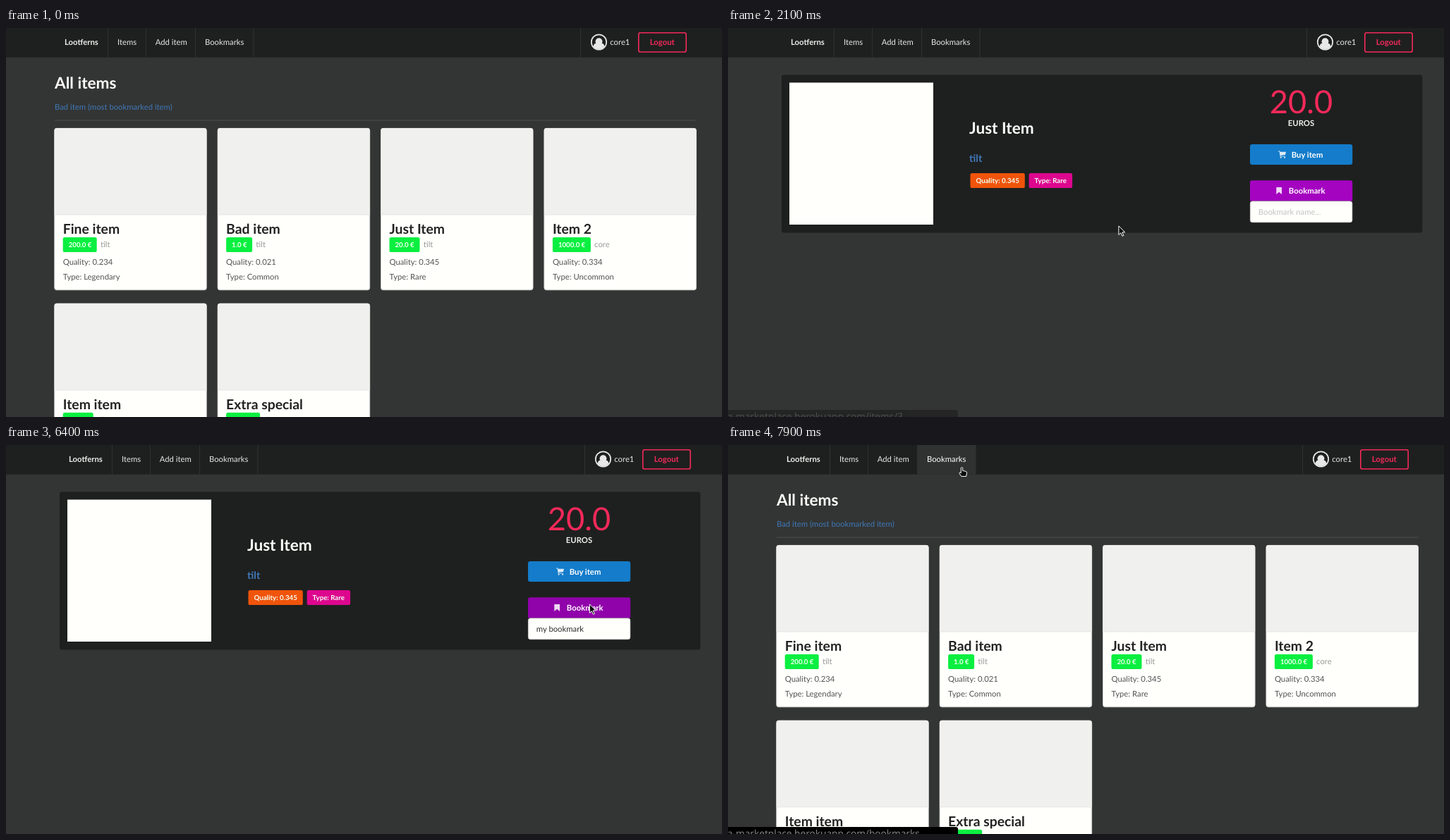
Write an HTML page that moves like this. It is 1015 px wide and 552 px high and loops after 8000 ms.

```html
<!DOCTYPE html>
<html lang="en">
<head>
<meta charset="utf-8">
<title>Item shop</title>
<style>
  html, body { margin: 0; width: 100%; height: 100%; overflow: hidden; background: #333534; }
  svg { display: block; }
  text { font-family: Lato, sans-serif; text-rendering: geometricPrecision; white-space: pre; }
  .status { font-family: "Noto Sans", sans-serif; }
</style>
</head>
<body>
<svg id="stage" width="1015" height="552" viewBox="0 0 1015 552"></svg>
<script>
const EM = 11.3, DARK = '#1e201f', RED = '#f3295a', WHITE = '#fffffb', LINK = '#4078b8';
const stage = document.getElementById('stage');

const text = (x, y, s, fill, size = EM, weight = 400, extra = '') =>
  `<text x="${x}" y="${y}" fill="${fill}" font-size="${size}" font-weight="${weight}" ${extra}>${s}</text>`;
const bold = (x, y, s, fill, size, extra) => text(x, y, s, fill, size, 700, extra);
const rect = (x, y, w, h, fill, r = 0, extra = '') =>
  `<rect x="${x}" y="${y}" width="${w}" height="${h}" rx="${r}" fill="${fill}" ${extra}/>`;
const path = (d, fill, extra = '') => `<path d="${d}" fill="${fill}" ${extra}/>`;
const at = (x, y, inner) => `<g transform="translate(${x} ${y})">${inner}</g>`;
const label = (x, y, w, s, fill) => rect(x, y, w, 21, fill, 2.6) + bold(x + 8, y + 14, s, '#f4fff4', 9.69);

const avatar = '<circle r="10.7" fill="none" stroke="#e8e8e8" stroke-width="1.7"/>' +
  '<circle cy="-.8" r="4.9" fill="#e8e8e8"/>' +
  path('M-8 6Q-7 1.7-4 1.7A6 6 0 0 0 4 1.7Q7 1.7 8 6A10 10 0 0 1-8 6Z', '#e8e8e8');

function nav(dx, hover) {
  const lines = [144.5, 198.5, 268.5, 351, 814.5]
    .map(x => rect(x - .5, 0, 1, 41.7, '#303231')).join('');
  return rect(0, 0, 1015, 41.7, DARK) + at(dx, 0,
    (hover ? rect(269, 0, 82, 41.7, '#303232') : '') + lines +
    bold(83, 24.2, 'Lootferns', '#ececea') +
    text(158, 24.2, 'Items', '#e6e6e4') +
    text(211.7, 24.2, 'Add item', '#e6e6e4') +
    text(282, 24.2, 'Bookmarks', hover ? '#fff' : '#e6e6e4') +
    at(840.5, 20, avatar) +
    text(856.3, 23.7, 'core1', '#e6e6e4') +
    rect(896.8, 6.8, 67.4, 27.2, 'none', 2.6, `stroke="${RED}" stroke-width="1.6"`) +
    bold(912.8, 24.2, 'Logout', RED));
}

const cards = [
  ['Fine item', '200.0 €', 48, 'tilt', '0.234', 'Legendary'],
  ['Bad item', '1.0 €', 37, 'tilt', '0.021', 'Common'],
  ['Just Item', '20.0 €', 43, 'tilt', '0.345', 'Rare'],
  ['Item 2', '1000.0 €', 54, 'core', '0.334', 'Uncommon'],
  ['Item item', '20.0 €', 43, 'tilt', '0.300', 'Rare'],
  ['Extra special', '200.0 €', 48, 'tilt', '0.500', 'Rare']
];

function card([name, price, w, owner, quality, type], i, hover) {
  return at(68.7 + 231.4 * (i % 4), 142 + 248.8 * (i >> 2),
    rect(0, .4, 215.6, 229.4, WHITE, 3.2, 'stroke="#d4d4d2" stroke-width=".8"') +
    path('M0 123V3.2Q0 0 3.2 0H212.4Q215.6 0 215.6 3.2V123Z', '#f0f0ee') +
    rect(0, 122.6, 215.6, .8, '#e2e2e0') +
    bold(12, 149.8, name, hover ? '#2565b0' : '#222322', 19.37) +
    label(12, 155, w, price, '#0aef40') +
    text(w + 17.2, 169.3, owner, '#9a9a98') +
    text(12, 193.5, 'Quality: ' + quality, '#535352') +
    text(12, 214.8, 'Type: ' + type, '#535352'));
}

const listPage = (itemHover, menuHover) =>
  nav(0, menuHover) +
  bold(69, 86, 'All items', '#fdfdfa', 22.6) +
  text(69, 115.5, 'Bad item (most bookmarked item)', LINK) +
  rect(69, 130.6, 909.5, .9, '#505251') +
  cards.map((c, i) => card(c, i, itemHover && i === 2)).join('');

const typed = [[3600, 'm'], [3700, 'my'], [3900, 'my b'], [4200, 'my boo'], [4300, 'my book'],
  [4700, 'my bookma'], [4800, 'my bookmark']];

function itemPage(t) {
  const value = typed.reduce((s, [from, v]) => t >= from ? v : s, '');
  const focus = t >= 3000 && t < 6300;
  const caret = focus && !(t >= 5700 && t < 6000);
  const purple = t < 5500 ? '#a403c0' : t < 5700 ? '#9a03b6' : '#9002aa';
  const icon = 'opacity=".85"';
  return nav(6, false) +
    rect(76, 66.5, 908.3, 224, DARK, 3.2) +
    rect(87, 77.5, 204, 201.5, WHITE) +
    bold(342, 150, 'Just Item', '#fdfdfa', 22.6) +
    bold(342, 190, 'tilt', LINK, 14.5) +
    label(343.5, 206, 77.3, 'Quality: 0.345', '#f0540b') +
    label(426.6, 206, 61.5, 'Type: Rare', '#dd078e') +
    text(812.5, 121.3, '20.0', RED, 45.2, 400, 'text-anchor="middle"') +
    bold(812.5, 138.6, 'EUROS', '#f0f0ee', EM, 'text-anchor="middle"') +
    rect(740, 165, 145.2, 29, '#147cca', 3.2) +
    at(780, 174.5, path('M0 0H2.3L2.6 1.2H11L10 5.6L3.6 6.3V7.2H9.8V8H2.7L1.7 1H0Z', '#fff', icon) +
      '<circle cx="3.6" cy="9.2" r="1" fill="#eee"/><circle cx="9.2" cy="9.2" r="1" fill="#eee"/>') +
    bold(798.7, 183.5, 'Buy item', '#fff') +
    path('M740 245.5V219.4Q740 216.2 743.2 216.2H882Q885.2 216.2 885.2 219.4V245.5Z', purple) +
    path('M777.3 226H785V236L781.1 232.7L777.3 236Z', '#fff', icon) +
    bold(794.8, 235, 'Bookmark', '#fff') +
    rect(740.4, 245.9, 144.4, 29.8, WHITE, 3, `stroke="${focus ? '#85b7d9' : '#dededc'}" stroke-width=".8"`) +
    `<text x="751.8" y="264.7" font-size="${EM}" fill="${value ? '#2b2b2b' : '#c2c2c0'}" id="field">` +
    `${value || 'Bookmark name...'}</text>` +
    (caret ? rect(751.5, 253.5, 1, 13.5, '#111', 0, 'id="caret"') : '');
}

function status(url, alpha) {
  return `<g opacity="${alpha}">` + rect(-6, 542, 332, 20, '#000', 3) +
    text(-1, 556, 'a-marketplace.herokuapp.com/' + url, '#868686', 13.6, 400, 'class="status"') + '</g>';
}

const outline = 'stroke="#fff" stroke-width="1" stroke-linejoin="round"';
const pointers = {
  arrow: path('M.4 .4V13L3.3 10.2L5.4 14.8L7.4 13.9L5.3 9.4H9.3Z', '#0a0a0a', outline),
  hand: path('M-1.2 .8Q0-.4 1.2 .8V5L5.2 5.8Q7.2 6.2 7 8.2L6.2 13H-.6L-3.4 9.2Q-3.9 7.2-2.3 7.4L-1.2 8.2Z',
    '#0a0a0a', outline),
  beam: path('M-2.5-6.5H-1L0-5.5L1-6.5H2.5M0-5.5V5.5M-2.5 6.5H-1L0 5.5L1 6.5H2.5', 'none', 'stroke="#fff" stroke-width="2.8"') +
    path('M-2.5-6.5H-1L0-5.5L1-6.5H2.5M0-5.5V5.5M-2.5 6.5H-1L0 5.5L1 6.5H2.5', 'none', 'stroke="#111" stroke-width="1.1"')
};

const track = [[300, 56, 253], [400, 56, 253], [1200, 558, 281], [1500, 558, 281], [1600, 553.5, 280.5],
  [2300, 553.5, 280.5], [2400, 730, 258], [2600, 730, 258], [3000, 797, 274], [5300, 797, 274],
  [5400, 812, 262], [5500, 836, 230], [5800, 836, 230], [6100, 827, 225.5], [7100, 827, 225.5],
  [7900, 331.5, 31.5]];

function pointer(t) {
  if (t < 300 || (t >= 4300 && t < 5400)) return '';
  const next = track.findIndex(k => k[0] >= t);
  const [t1, x1, y1] = track[next], [t0, x0, y0] = track[Math.max(0, next - 1)];
  const p = t1 > t0 ? (t - t0) / (t1 - t0) : 1, e = p * p * (3 - 2 * p);
  const within = (a, b) => t >= a && t < b;
  const kind = within(1200, 2000) || within(5500, 6300) || t >= 7900 ? 'hand'
    : within(2800, 5500) ? 'beam' : 'arrow';
  return at(x0 + (x1 - x0) * e, y0 + (y1 - y0) * e, pointers[kind]);
}

function draw(t) {
  const onItem = t >= 2100 && t < 6800;
  let bar = '';
  if (t >= 1200 && t < 2200) bar = status('items/3', t < 2000 ? 1 : t < 2100 ? .72 : .3);
  if (t >= 7900) bar = status('bookmarks', 1);
  stage.innerHTML = (onItem ? itemPage(t) : listPage(t >= 1200 && t < 2100, t >= 7900)) + bar + pointer(t);

  // the caret follows the typed text
  const caret = document.getElementById('caret'), field = document.getElementById('field');
  if (caret && t >= 3600) caret.setAttribute('x', 751.8 + field.getComputedTextLength());
}

const start = performance.now();
let shown = -1;
function frame() {
  const t = Math.floor((performance.now() - start) % 8000 / 100) * 100;
  if (t !== shown) draw(shown = t);
  requestAnimationFrame(frame);
}
frame();
</script>
</body>
</html>
```
